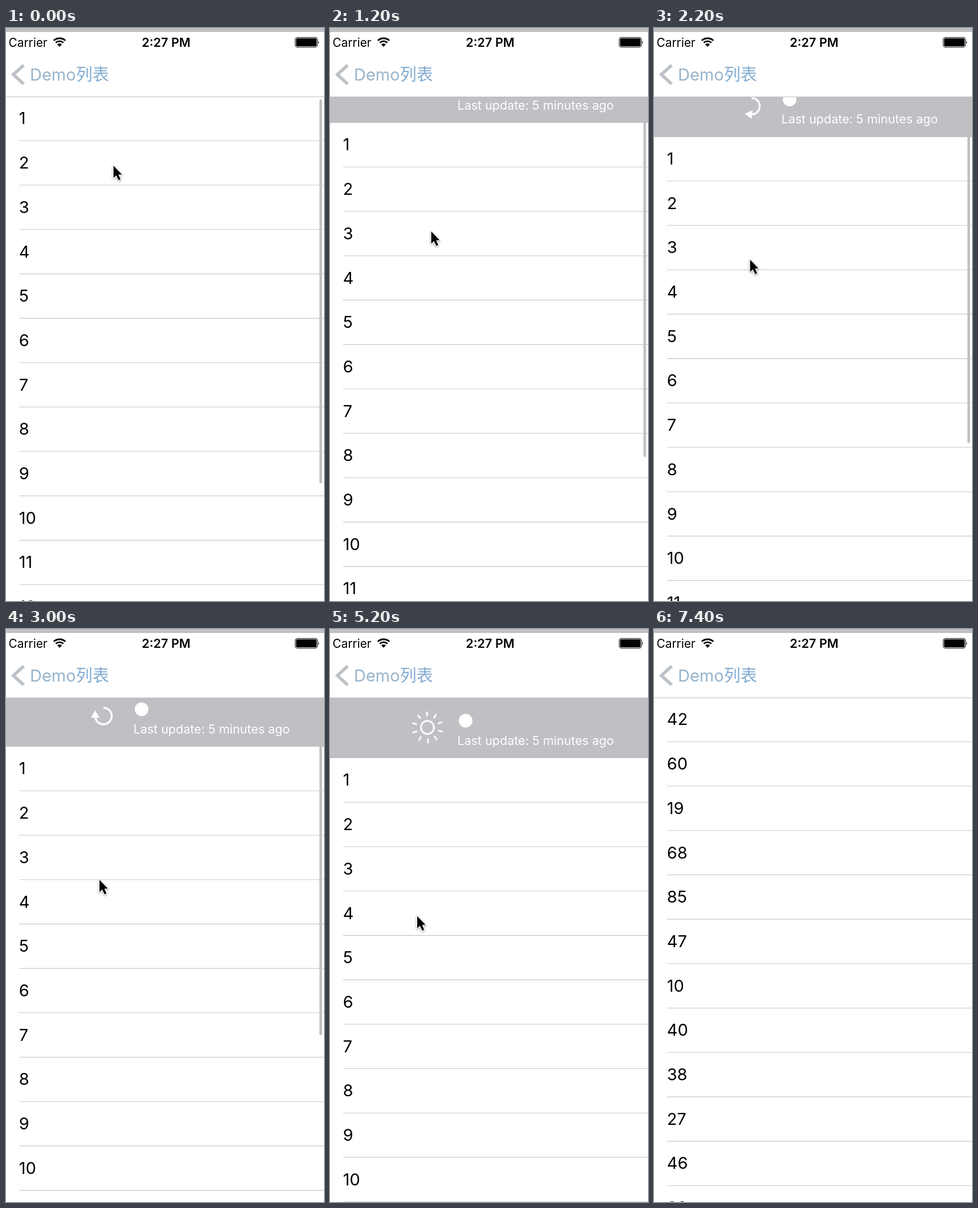
These frames come from a looping animation (558x1003 px, 7.6 s). An HTML page:

```html
<!DOCTYPE html>
<html lang="en">
<head>
<meta charset="utf-8">
<title>Pull to refresh</title>
<style>
@property --pull { syntax: "<number>"; inherits: true; initial-value: 0; }

html, body { margin: 0; width: 100%; height: 100%; overflow: hidden; background: #fff; }

svg {
  --grey: #bfbfc4;
  --sweep: clamp(0, 185 + (var(--pull) - 70) * 5.3, 360);
  display: block;
  width: 100vw;
  height: 100vh;
  font-family: Inter, "Noto Sans CJK SC", "Noto Sans CJK", sans-serif;
  animation: pull 7600ms infinite;
}

.sheet { transform: translateY(calc(120px + var(--pull) * 1px)); }
.rows text { font-size: 29px; }
.rows line { stroke: #c8c7cc; stroke-width: 1.1; }
.before { animation: before 7600ms step-end infinite; }
.after { animation: after 7600ms step-end infinite; }

.bar { height: calc((672 - var(--pull)) * 1px); animation: bar 7600ms linear infinite; }
.arrow { animation: arrow 7600ms linear infinite; }
.arc {
  transform: rotate(-90deg);
  stroke-dasharray: 360;
  stroke-dashoffset: calc((360 - var(--sweep)) * 1px);
}
.head { transform: rotate(calc(var(--sweep) * 1deg)); }
.sun { animation: sun 7600ms linear infinite; }
.sun-ring { animation: shrink 7600ms linear infinite; }
.rays { animation: spin 7600ms linear infinite; }
.cursor { animation: cursor 7600ms infinite; }

@keyframes pull {
  0% { --pull: 0; animation-timing-function: steps(12); }
  15.789% { --pull: 46; animation-timing-function: steps(10); }
  28.947% { --pull: 70.5; animation-timing-function: steps(8); }
  39.474% { --pull: 86; animation-timing-function: steps(9); }
  51.316%, 53.947% { --pull: 114; animation-timing-function: ease-out; }
  57.895%, 90.789% { --pull: 106; animation-timing-function: ease-in-out; }
  97.368%, 100% { --pull: 0; }
}
@keyframes cursor {
  0% { transform: translate(188.6px, 241px); animation-timing-function: steps(12); }
  15.789% { transform: translate(177.6px, 356px); animation-timing-function: steps(10); }
  28.947% { transform: translate(168.6px, 405.5px); animation-timing-function: steps(8); }
  39.474% { transform: translate(164px, 439px); animation-timing-function: steps(9); }
  51.316%, 78.947% { transform: translate(153px, 502.5px); animation-timing-function: ease-in; }
  84.211% { transform: translate(206px, 517px); animation-timing-function: linear; }
  90.789%, 100% { transform: translate(320px, 1020px); }
}
@keyframes before {
  0% { visibility: visible; }
  90.789%, 100% { visibility: hidden; }
}
@keyframes after {
  0% { visibility: hidden; }
  90.789%, 100% { visibility: visible; }
}
@keyframes bar {
  0%, 56.579% { opacity: 1; }
  61.842%, 100% { opacity: 0; }
}
@keyframes arrow {
  0%, 53.947% { opacity: 1; }
  56.579%, 100% { opacity: 0; }
}
@keyframes sun {
  0%, 53.947% { opacity: 0; }
  56.579%, 100% { opacity: 1; }
}
@keyframes shrink {
  0%, 53.947% { r: 14.5px; }
  59.211%, 100% { r: 11.4px; }
}
@keyframes spin {
  0%, 53.947% { transform: rotate(-81.2deg) scale(.5); }
  59.211% { transform: rotate(-52.4deg) scale(1); }
  100% { transform: rotate(170.8deg) scale(1); }
}
</style>
</head>
<body>
<svg viewBox="0 0 558 1003" preserveAspectRatio="none">
  <rect width="558" height="1003" fill="var(--grey)"/>

  <g class="sheet">
    <text x="223.5" y="-23.4" font-size="21.5" fill="#fff">Last update: 5 minutes ago</text>
    <circle cx="238" cy="-65.5" r="12" fill="#fff"/>
    <g transform="translate(171 -53.7)" fill="none" stroke="#fff" stroke-width="3.4">
      <g class="arrow">
        <circle class="arc" r="14.5" pathLength="360"/>
        <path class="head" d="M-3-22V-7L10-14.5Z" fill="#fff" stroke="none"/>
      </g>
      <g class="sun" stroke-width="3">
        <circle class="sun-ring" r="11.4"/>
        <g class="rays" stroke-linecap="round"></g>
      </g>
    </g>
    <rect width="558" height="1003" fill="#fff"/>
    <g class="rows before"></g>
    <g class="rows after"></g>
  </g>

  <rect class="bar" x="550" y="125" width="4.6" rx="2.3" fill="var(--grey)"/>

  <rect y="7" width="558" height="113" fill="#fff"/>
  <rect y="120" width="558" height="1" fill="#c3c3c7"/>

  <text x="4.6" y="33" font-size="20.8">Carrier</text>
  <g transform="translate(94 33)" fill="none" stroke="#000" stroke-width="2.8">
    <path d="M0 0L-4.2-4.4A6 6 0 0 1 4.2-4.4Z" fill="#000" stroke="none"/>
    <path d="M-6.7-7.2A9.8 9.8 0 0 1 6.7-7.2M-10.2-11A15 15 0 0 1 10.2-11"/>
  </g>
  <text x="281" y="33" font-size="21.6" font-weight="600" text-anchor="middle">2:27 PM</text>
  <rect x="507.5" y="16.5" width="39" height="17" rx="3.5" fill="none" stroke="#000"/>
  <rect x="509" y="18" width="36" height="14" rx="2"/>
  <path d="M548 22.2Q550.4 25 548 28Z"/>

  <path d="M31 65L13 81.5L31 98" fill="none" stroke="#bcc2c7" stroke-width="5.6"/>
  <text x="42" y="92" font-size="29" fill="#98b4cb">Demo<tspan font-weight="300" fill="#83abd0">列表</tspan></text>

  <g class="cursor">
    <path d="M0 0V21.4L4.8 17L8.9 25.6L12.4 24.1L8.6 15.5H14.8Z" stroke="#fff" stroke-width="3"
      stroke-linejoin="round" paint-order="stroke" style="filter: drop-shadow(0 1.5px 1.5px #0006)"/>
  </g>
</svg>
<script>
const ROW = 77.7;

function add(parent, tag, attrs, text = "") {
  const node = document.createElementNS(parent.namespaceURI, tag);
  for (const [key, value] of Object.entries(attrs)) node.setAttribute(key, value);
  node.textContent = text;
  parent.append(node);
}

function fillRows(selector, values) {
  const group = document.querySelector(selector);
  values.forEach((value, i) => {
    const top = i * ROW;
    add(group, "text", { x: 22.7, y: top + 48.4 }, value);
    add(group, "line", { x1: 23, x2: 558, y1: top + 77.3, y2: top + 77.3 });
  });
}

fillRows(".before", Array.from({ length: 12 }, (_, i) => i + 1));
fillRows(".after", [42, 60, 19, 68, 85, 47, 10, 40, 38, 27, 46, 30]);

const rays = document.querySelector(".rays");
for (let i = 0; i < 10; i++) add(rays, "path", { d: "M0-20.5V-26.5", transform: `rotate(${i * 36})` });
</script>
</body>
</html>
```
